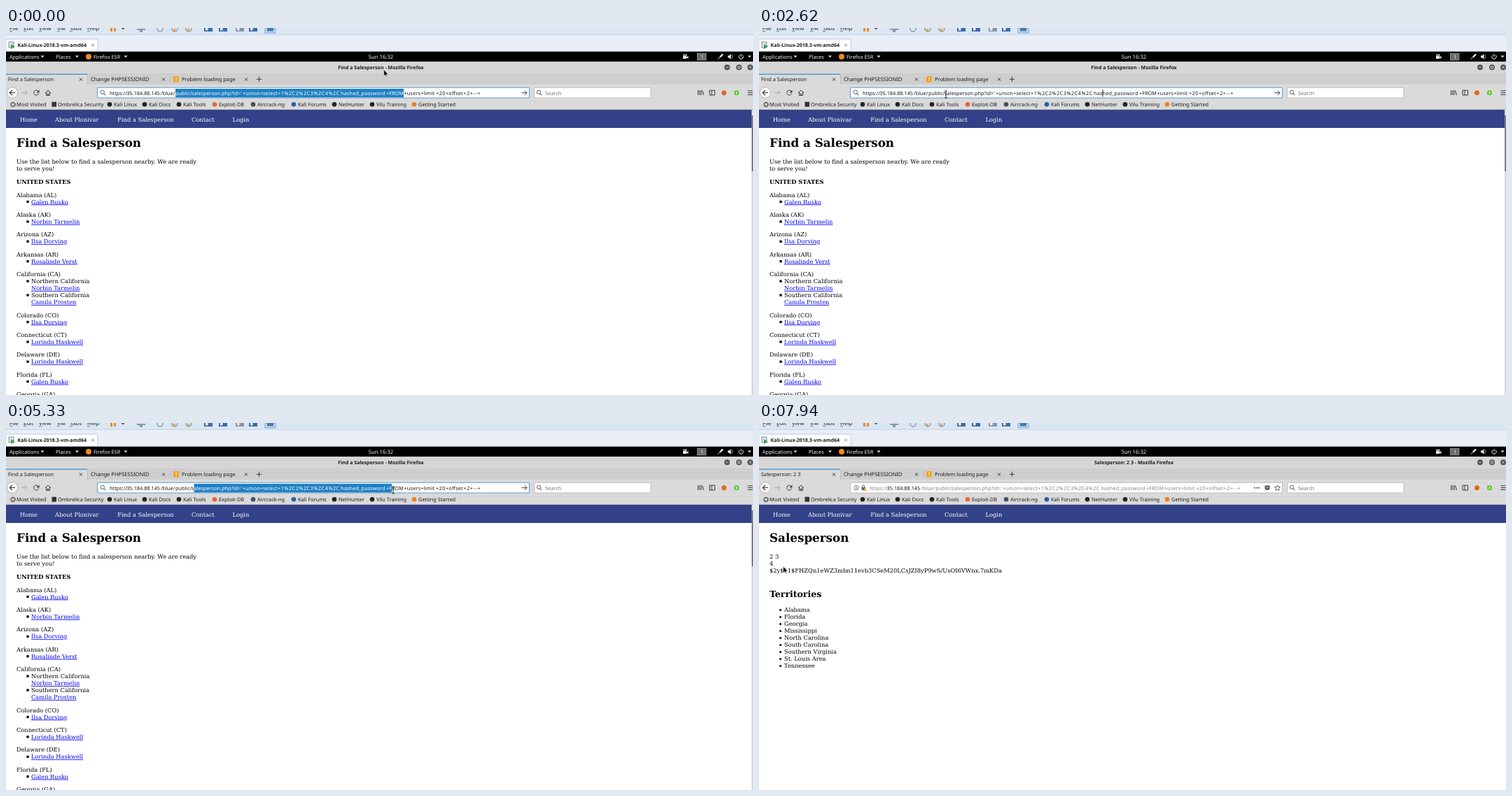
Write an HTML page that moves like this. It is 1067 by 525 pixels and loops after 8000 ms.

```html
<!DOCTYPE html>
<html lang="en">
<head>
<meta charset="utf-8">
<title>Find a Salesperson</title>
<style>
html, body { margin: 0; width: 100%; height: 100%; overflow: hidden; background: #fff; }
svg { display: block; }
text { font: 7.4px "Noto Sans", "Open Sans", sans-serif; fill: #1c1c1c; text-rendering: geometricPrecision; white-space: pre; }
text.b { font-weight: 700; font-size: 7.05px; }
.bar text { fill: #f2f2f2; }
.url text { font-size: 7.3px; }
.url text.query { letter-spacing: .15px; }
.url text.code { letter-spacing: .5px; }
.url.sel text { fill: #fff; }
.url.dim text { fill: #858585; }
.url.dim text.host { fill: #161616; }
.page text { font: 8.3px "DejaVu Serif", serif; fill: #000; }
.page text.h1 { font-size: 16.75px; font-weight: 700; }
.page text.h2 { font-size: 12.5px; font-weight: 700; }
.page text.strong { font-weight: 700; }
.page text.a { fill: #0000ee; text-decoration: underline; }
.page .nav text { fill: #fff; }
.ln { fill: none; stroke: #3a3a3a; stroke-width: 1; }
</style>
</head>
<body>
<svg id="stage" width="1067" height="525" viewBox="0 0 1067 525"></svg>
<script>
const LOOP = 8000, LOADING = 6680, LOADED = 7260, DONE = 7700;

const text = (x, y, s, cls = '', extra = '') => `<text x="${x}" y="${y}" class="${cls}" ${extra}>${s}</text>`;
const rect = (x, y, w, h, fill, extra = '') => `<rect x="${x}" y="${y}" width="${w}" height="${h}" fill="${fill}" ${extra}/>`;
const dot = (x, y, r, fill, extra = '') => `<circle cx="${x}" cy="${y}" r="${r}" fill="${fill}" ${extra}/>`;
const line = (d, extra = '') => `<path class="ln" d="${d}" ${extra}/>`;
const shape = (d, fill, extra = '') => `<path d="${d}" fill="${fill}" ${extra}/>`;
const drop = (x, fill) => shape(`M${x - 2.5} 39.5h5l-2.5 3z`, fill);
const cross = (x, y) => line(`M${x - 2} ${y - 2}l4 4m0 -4l-4 4`);
const lens = (x, y) => line(`M${x + 1.8} ${y + 1.8}l2.7 2.7`) + dot(x, y, 2.7, 'none', 'class="ln" style="stroke-width:.8"');

function viewer() {
  const menu = [[5, 'File'], [25, 'Edit'], [47, 'View'], [73, 'VM'], [91, 'Tabs'], [116, 'Help']];
  return rect(0, 0, 1067, 10, '#dbe6f3') + rect(0, 9, 1067, 1, '#c6d4e6') + rect(0, 10, 1067, 24, '#e9eef7') +
    menu.map(([x, s]) => text(x, 3.4, s, '', 'style="font-size:8px"') + rect(x, 4.5, 4, .6, '#333')).join('') +
    rect(149, 0, 3, 5, '#ee8a2b') + rect(154, 0, 3, 5, '#ee8a2b') + shape('M164.5 0h5l-2.5 2.5z', '#555') +
    rect(187, 1, 12, 2, '#8b97a8') + rect(191, 3, 4, 3, '#8b97a8') +
    [220, 241, 261].map(x => dot(x, 1, 4, 'none', 'stroke="#7c8ca6" stroke-width="1.3"')).join('') +
    shape('M238 3l4 -3v6z', '#e8a33c') + shape('M258 3l4 -3v6z', '#e8a33c') +
    [[283, '#3c69a8'], [304, '#3c69a8'], [328, '#8794a8'], [347, '#3c69a8']]
      .map(([x, c]) => rect(x, 0, 12, 5, c) + rect(x + 2, 0, 3.5, 3.5, '#eaf1fa')).join('') +
    rect(370, 0, 15, 7, '#bcd7f3', 'stroke="#6a9bd1" stroke-width=".8"') + rect(373, 0, 9, 4.5, '#4b76ad') +
    rect(0, 16, 131, 18, '#fff', 'stroke="#b3c2d8" stroke-width=".8"') +
    rect(4, 20, 7, 8, '#dfe5ec', 'stroke="#67788e" stroke-width=".8"') + shape('M7 23l6 3.5l-6 3.5z', '#39a746') +
    text(16.5, 27.4, 'Kali-Linux-2018.3-vm-amd64', 'b') +
    line('M122 22.5l4 4m0 -4l-4 4', 'style="stroke:#888"');
}

function topBar() {
  return '<g class="bar">' + rect(0, 33.7, 1067, 14.6, '#000') +
    text(5, 43.6, 'Applications') + drop(52, '#ddd') + text(71, 43.6, 'Places') + drop(101.5, '#ddd') +
    dot(118, 41, 4, '#f08a24') + text(125, 43.6, 'Firefox ESR') + drop(171, '#ddd') +
    text(535.5, 43.6, 'Sun 16:32', '', 'text-anchor="middle" style="font-size:7.7px"') +
    rect(967, 40, 5, 4, '#eee') + shape('M971 42l3.5 -2v4z', '#eee') + dot(968.5, 38.6, 1.2, '#eee') + dot(971.3, 38.6, 1.2, '#eee') +
    rect(987.5, 36.5, 12.5, 9.5, '#6b6b6b', 'stroke="#aaa" stroke-width=".7"') + text(994, 43.9, '1', '', 'text-anchor="middle"') +
    line('M1017 44.5l3.5 -3.5', 'style="stroke:#eee"') + line('M1020 41.5l4 -4', 'style="stroke:#eee;stroke-width:2.4"') +
    shape('M1031 39.5h2l2.5 -2.5v8l-2.5 -2.5h-2z', '#eee') + line('M1037 38.5q2 2.5 0 5', 'style="stroke:#999"') +
    line('M1048 38.6a3.2 3.2 0 1 0 4 0M1050 37v4', 'style="stroke:#eee"') + drop(1062, '#ddd') + '</g>';
}

function chrome() {
  const marks = [
    [154, '#222', 'Kali Linux'], [204, '#222', 'Kali Docs'], [253, '#222', 'Kali Tools'],
    [304, '#e8682c', 'Exploit-DB'], [359, '#454f57', 'Aircrack-ng'], [417, '#2b5f9e', 'Kali Forums'],
    [475, '#222', 'NetHunter'], [529, '#222', 'Vilu Training'], [589, '#ee7f22', 'Getting Started']];
  const windowButtons = [1030, 1047, 1063].map(x => dot(x, 56.3, 4, '#555')).join('') +
    line('M1028 56.3h4M1045.5 54.8h3v3h-3zM1061.5 54.8l3 3m0 -3l-3 3', 'style="stroke:#e4e4e4;stroke-width:.8"');
  return rect(0, 48.3, 1067, 17, '#d6d6d6') + windowButtons + text(535.5, 58.9, '', 'b', 'id="title" text-anchor="middle"') +
    rect(0, 65, 1067, 16.5, '#cecece') + rect(0, 66, 116, 16, '#dadada') + rect(0, 65.6, 116, 1.2, '#3b8fd0') +
    rect(116, 67, .7, 14, '#b2b2b2') + rect(234.5, 69, .7, 10, '#b2b2b2') +
    '<g id="throb">' + dot(4, 73.3, 1.1, '#4a4a4a') + '</g>' + text(3, 76, '', '', 'id="tab"') +
    text(121, 76, 'Change PHPSESSIONID', '', 'style="font-size:7.6px"') + text(251, 76, 'Problem loading page') +
    rect(239, 69, 8, 8.5, '#f0a21b', 'rx="1.5"') + rect(242.5, 70.7, 1.2, 3, '#fff') + rect(242.5, 74.6, 1.2, 1.2, '#fff') +
    [107, 225, 343].map(x => cross(x, 73.5)).join('') + line('M361.5 69.7v7.2M357.9 73.3h7.2') +
    rect(0, 81.5, 1067, 35.5, '#dadada') +
    dot(9, 92.5, 7.8, '#f7f7f7', 'stroke="#a9a9a9" stroke-width=".8"') + line('M13 92.5h-7.5M8.8 89l-3.5 3.5l3.5 3.5', 'style="stroke-width:1.2"') +
    line('M22 92.5h8M26.7 89.2l3.3 3.3l-3.3 3.3', 'style="stroke:#aaa"') +
    line('M46.3 91a3.5 3.5 0 1 0 .2 2.7') + shape('M47.5 88.5v4h-4z', '#3a3a3a') +
    line('M56 93l4 -4l4 4M57.5 92v4.5h5v-4.5') + rect(59.2, 93.5, 1.6, 3, '#3a3a3a') +
    rect(130.5, 85.3, 617, 14.7, '#fff', 'id="field" rx="1.5"') +
    rect(754.5, 85.3, 166.5, 14.7, '#fff', 'rx="1.5" stroke="#b0b0b0" stroke-width=".8"') +
    lens(761, 91.8) + text(770, 95.6, 'Search', '', 'style="fill:#777"') +
    line('M988.5 89v7M990.8 89v7M993 89v7M994.5 89.3l2 6.7') +
    line('M1005 89.2h7.5v6.8h-7.5zM1008 89.2v6.8') + dot(1025.5, 92.7, 3.5, '#df6a1f', 'id="addon"') +
    dot(1043.5, 92.7, 3.6, '#5cc930') + rect(1042.7, 90.9, 1.6, 3.6, '#e6f8dc') +
    line('M1059.5 89.8h7M1059.5 92.6h7M1059.5 95.4h7') +
    dot(10, 109.5, 2.8, 'none', 'class="ln" stroke-dasharray="1.5 .7" style="stroke-width:1.8"') + text(15, 112.2, 'Most Visited') +
    rect(65.5, 105.7, 6.5, 7, '#333') + text(74, 112.2, 'Ombrelica Security') +
    marks.map(([x, c, s]) => dot(x - 6, 109.3, 3.3, c) + text(x, 112.2, s)).join('') +
    rect(0, 116.2, 1067, .8, '#b8b8b8');
}

// Pieces of the address: offset from the start of the line, text, class
const address = [
  [0, 'https://'], [24.4, '35.184.88.145', 'host'], [73, '/blue/'], [94, 'public/'], [117, "salesperson.php?id='"],
  [190, '+union+select', 'query'], [240, '+1%2C2%2C3%2C4%2C', 'code'], [330, 'hashed_password', 'query'],
  [395, '+FROM'], [420.5, '+users+limit', 'query'], [466, '+20', 'code'], [480, '+offset', 'query'], [505.5, '+2+--+', 'code']];

function addressBar() {
  const run = address.map(([x, s, cls]) => text(148 + x, 95.6, s, cls)).join('');
  return '<g id="search">' + lens(137.8, 91.8) + '</g>' +
    '<g id="info">' + dot(139, 92.7, 3.2, 'none', 'class="ln" style="stroke-width:.7"') + rect(138.6, 92.2, .9, 2.4, '#444') + rect(138.6, 90.7, .9, .9, '#444') +
    rect(146.5, 92, 5.5, 4, '#666') + line('M147.5 92v-1.5a1.7 1.7 0 0 1 3.4 0v1.5', 'style="stroke:#666"') + shape('M151.5 92.5l2.5 4.5h-5z', '#f2b01e') +
    [708, 711, 714].map(x => dot(x, 92.7, 1, '#444')).join('') +
    shape('M722.5 89.5h7v3a3.5 3.5 0 0 1 -7 0z', '#555') + line('M724.3 91.7l1.7 1.6l1.7 -1.6', 'style="stroke:#fff"') +
    line('M740.5 88.8l1.2 2.6l2.8 .3l-2.1 1.9l.6 2.8l-2.5 -1.4l-2.5 1.4l.6 -2.8l-2.1 -1.9l2.8 -.3z', 'style="stroke-width:.8"') + '</g>' +
    '<g id="go">' + line('M736.5 92.7h7.5M740.8 89.4l3.3 3.3l-3.3 3.3') + '</g>' +
    `<g id="url" class="url">${run}</g>` + rect(0, 87, 0, 12.3, '#1f80c3', 'id="mark"') +
    '<clipPath id="cut"><rect id="cutBox" y="86" height="14"/></clipPath>' +
    `<g class="url sel" clip-path="url(#cut)">${run}</g>` + rect(0, 88, .8, 10.5, '#000', 'id="caret"');
}

const nav = () => '<g class="nav">' + rect(0, 117, 1067, 26, '#334288') +
  [[20, 'Home'], [70, 'About Plonivar'], [159.2, 'Find a Salesperson'], [265, 'Contact'], [323.5, 'Login']]
    .map(([x, s]) => text(x, 133.6, s)).join('') + '</g>';

function listPage() {
  const galen = 'Galen Rusko', norbin = 'Norbin Tarmelin', ilsa = 'Ilsa Dorving', lorinda = 'Lorinda Haskwell';
  const states = [
    ['Alabama (AL)', galen], ['Alaska (AK)', norbin], ['Arizona (AZ)', ilsa], ['Arkansas (AR)', 'Rosalinde Verst'],
    ['California (CA)', norbin, 'Camila Prosten'], ['Colorado (CO)', ilsa], ['Connecticut (CT)', lorinda],
    ['Delaware (DE)', lorinda], ['Florida (FL)', galen], ['Georgia (GA)']];
  const bullet = y => rect(29.4, y - 4.6, 3.3, 3.3, '#000');
  let y = 241.5, out = '';
  for (const [state, ...people] of states) {
    out += text(15, y, state);
    people.forEach((name, i) => {
      y += 10;
      out += bullet(y);
      if (people.length > 1) {
        out += text(36, y, ['Northern', 'Southern'][i] + ' California');
        y += 10;
      }
      out += text(36, y, name, 'a');
    });
    y += 18.4;
  }
  return '<g id="list" class="page">' + rect(0, 117, 1067, 408, '#fff') + nav() +
    text(15, 170.4, 'Find a Salesperson', 'h1') + text(15, 194, 'Use the list below to find a salesperson nearby. We are ready') +
    text(15, 204, 'to serve you!') + text(15, 223, 'UNITED STATES', 'strong') + out +
    rect(1065, 117, 2, 408, '#d8d8d8') + rect(1065.3, 125, 1.7, 80, '#6e6e6e') + '</g>';
}

function detailPage() {
  const areas = ['Alabama', 'Florida', 'Georgia', 'Mississippi', 'North Carolina', 'South Carolina', 'Southern Virginia', 'St. Louis Area', 'Tennessee'];
  return '<g id="detail" class="page">' + rect(0, 117, 1067, 408, '#fff') + nav() +
    text(15, 170.4, 'Salesperson', 'h1') + text(15, 194, '2 3') + text(15, 204, '4') +
    text(15, 214, '$2y$11$FHZQn1eWZ3mbn11evb3CSeM20LCsJZI8yP9wS/UsOI6VWnx.7mKDa') +
    text(15, 248.6, 'Territories', 'h2') +
    areas.map((s, i) => dot(30.6, 267.6 + i * 10, 1.5, '#000') + text(36, 270.4 + i * 10, s)).join('') + '</g>';
}

const pointers = '<g id="arrow">' +
  shape('M0 0V9.5L2.2 7.5L3.6 10.3L5 9.7L3.7 7H6.7Z', '#111', 'stroke="#fff" stroke-width=".6"') + '</g>' +
  '<g id="beam">' + line('M-2 -5h1.5l.5 .5l.5 -.5h1.5M0 -4.5v9M-2 5h1.5l.5 -.5l.5 .5h1.5', 'style="stroke:#111;stroke-width:.9"') + '</g>';

document.getElementById('stage').innerHTML =
  viewer() + topBar() + chrome() + addressBar() + listPage() + detailPage() + pointers;

const el = {};
for (const node of document.querySelectorAll('[id]')) el[node.id] = node;

// Stepped moves: first and last step time, steps, pointer x, y, selection end
const moves = [
  [370, 370, 1, 538.5, 60, 568],
  [1240, 1650, 4, 491.5, 93, 568],
  [1930, 1930, 1, 492, 93, 0],
  [2070, 2480, 4, 238, 92, 0],
  [2620, 2620, 1, 267, 95, 0],
  [2760, 2890, 2, 268, 95, 0],
  [3010, 3010, 1, 270, 95, 268.6],
  [3160, 3910, 6, 350, 95, 349],
  [4060, 4220, 2, 381, 95, 371],
  [4350, 5060, 6, 534, 95, 525],
  [5180, 5330, 2, 553, 96, 551],
  [5600, 5600, 1, 576, 95, 0],
  [5730, 5730, 1, 590, 95, 0],
  [6160, 6410, 2, 593, 95.5, 0],
  [7550, 7700, 2, 300, 150, 0],
  [7820, 7820, 1, 60, 226, 0],
  [7940, 7940, 1, 34.5, 205, 0]];

function pose(t) {
  let at = [539.5, 59.5, 568];
  for (const [from, to, n, ...goal] of moves) {
    if (t < from) break;
    const step = to > from ? Math.min(n, 1 + Math.floor((t - from) / (to - from) * (n - 1) + 1e-6)) : n;
    at = at.map((v, i) => v + (goal[i] - v) * step / n);
  }
  return at;
}

const show = (node, on) => node.style.display = on ? '' : 'none';
const place = (node, x, y) => node.setAttribute('transform', `translate(${x} ${y})`);

function draw(t) {
  const [x, y, end] = pose(t);
  const loading = t >= LOADING, loaded = t >= LOADED, busy = loading && t < DONE;
  const inField = x > 130 && x < 748 && y > 84 && y < 101;
  show(el.arrow, !inField);
  show(el.beam, inField);
  place(inField ? el.beam : el.arrow, x, y);

  const start = t < 1930 ? 242 : 268.6, width = Math.max(0, end - start);
  for (const box of [el.mark, el.cutBox]) {
    box.setAttribute('x', start);
    box.setAttribute('width', width);
  }
  show(el.caret, !loading && t >= 1930 && !width);
  el.caret.setAttribute('x', t < 3010 ? 490.6 : t < 5600 ? 268.2 : 591.6);

  el.url.setAttribute('class', loading ? 'url dim' : 'url');
  place(el.url, loaded ? 10.2 : 0, 0);
  el.field.setAttribute('stroke', loading ? '#b0b0b0' : '#5a9fd6');
  el.field.setAttribute('stroke-width', loading ? .8 : 1.1);
  show(el.search, !loaded);
  show(el.info, loaded);
  show(el.go, !loading);
  el.addon.setAttribute('opacity', busy ? .5 : 1);

  const name = loaded ? 'Salesperson: 2 3' : 'Find a Salesperson';
  el.title.textContent = name + ' - Mozilla Firefox';
  el.tab.textContent = name;
  el.tab.setAttribute('x', busy ? 15 : 3);
  show(el.throb, busy);
  place(el.throb, 3.5 - 3.5 * Math.cos((t - LOADING) / 510 * Math.PI), 0);
  show(el.list, !loaded);
  show(el.detail, loaded);
}

const began = performance.now();
function tick() {
  draw((performance.now() - began) % LOOP);
  requestAnimationFrame(tick);
}
tick();
</script>
</body>
</html>
```
